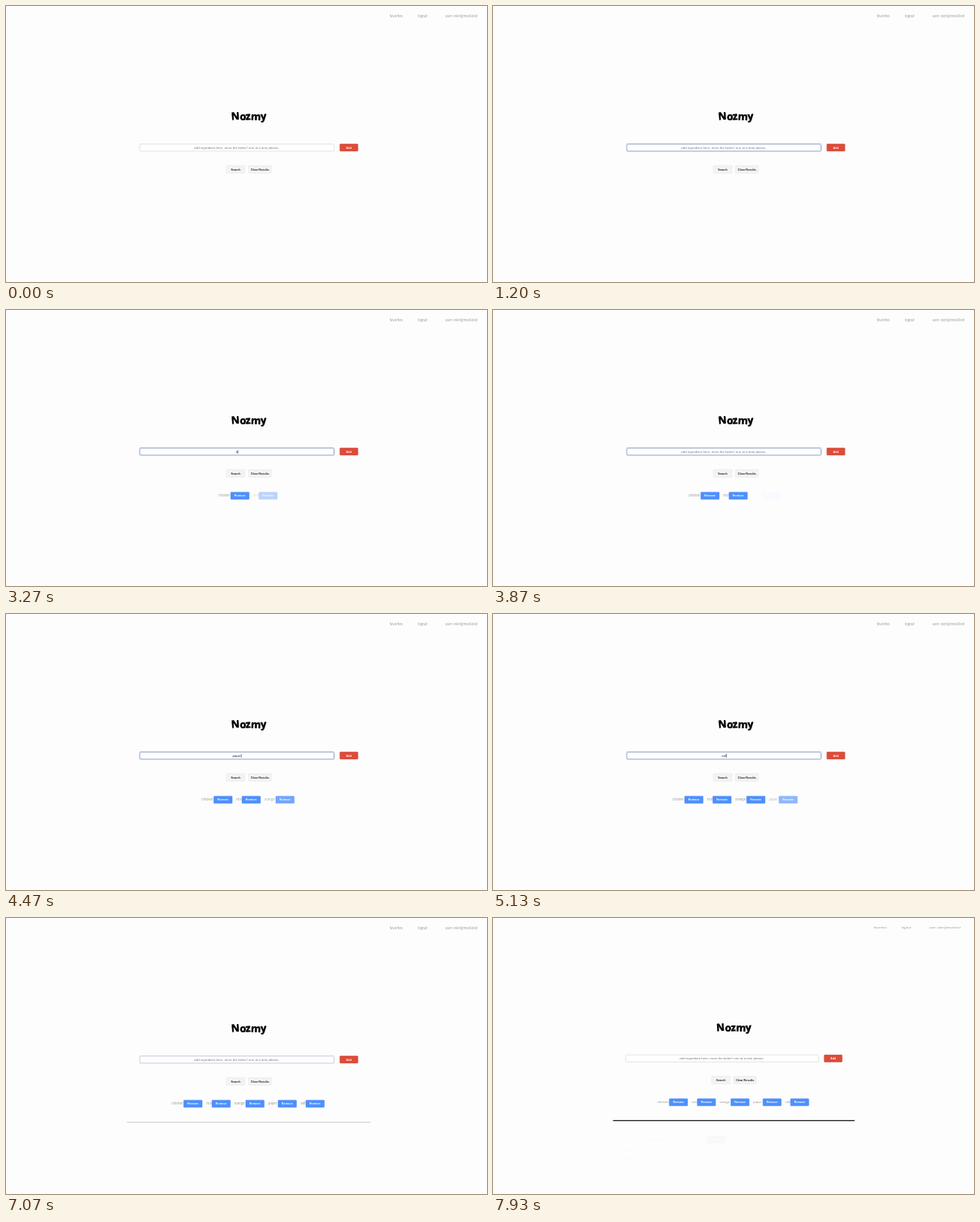
An HTML page for the animation above (8 s loop, 640 by 367 pixels).

```html
<!DOCTYPE html>
<html lang="en">
<head>
<meta charset="utf-8">
<title>Ingredient search</title>
<style>
  html, body { margin: 0; width: 100%; height: 100%; overflow: hidden; background: #fefdfe; }
  svg { display: block; width: 640px; height: 367px; }
  text { font: 4.4px "Liberation Sans", Arial, sans-serif; fill: #222; }
  .thin { font: 300 4.7px Lato, sans-serif; fill: #555; }
  .label { font: bold 3.8px "Liberation Sans", Arial, sans-serif; text-anchor: middle; }
  .white { fill: #fff; }
  .title { font: 600 13.5px "Noto Sans", sans-serif; fill: #000; stroke: #000; stroke-width: .5; stroke-linejoin: round; }
  .mid { text-anchor: middle; }
</style>
</head>
<body>
<svg viewBox="0 0 640 367">
  <g id="page">
    <text class="thin" x="510.5" y="14.6">favorites</text>
    <text class="thin" x="548" y="14.6">logout</text>
    <text class="thin" x="627.5" y="14.6" text-anchor="end">user: olen@mezil.test</text>
    <text class="title mid" x="323.3" y="151.6" rotate="-4 3 -3 2 -3">Nozmy</text>
    <rect id="field" x="178" y="183.5" width="258.5" height="9.5" rx="1" fill="#fff"/>
    <text id="entry" class="mid" x="307" y="189.9"></text>
    <rect id="caret" y="186" width=".5" height="5" fill="#000"/>
    <g id="buttons"></g>
    <g id="chips"></g>
    <rect id="rule" x="161" y="270.9" width="324" height="1.3" fill="#111"/>
    <g id="results"></g>
  </g>
</svg>
<script>
const LOOP = 8000;
const SEARCH = 6950, RESULTS = 7870;
const PLACEHOLDER = "add ingredient here, more the better! one at a time please.";
// start and step describe the typing, added is when the chip appears
const items = [
  { word: "chicken", start: 1330, step: 75,  added: 1870, labelWidth: 16.5 },
  { word: "rice",    start: 2300, step: 130, added: 2850, labelWidth: 8 },
  { word: "orange",  start: 3240, step: 75,  added: 3770, labelWidth: 15.5 },
  { word: "paper",   start: 4130, step: 75,  added: 4550, labelWidth: 13.5 },
  { word: "salt",    start: 4980, step: 70,  added: 5480, labelWidth: 7.5 }
];
const CHIP_BUTTON = 24.5, CHIP_GAP = 5, CHIP_CENTER = 321.75;

const $ = id => document.getElementById(id);
const clamp = v => Math.min(1, Math.max(0, v));
const swing = v => .5 - Math.cos(Math.PI * clamp(v)) / 2;

function add(parent, tag, attrs, text = "") {
  const el = document.createElementNS("http://www.w3.org/2000/svg", tag);
  for (const name in attrs) el.setAttribute(name, attrs[name]);
  el.textContent = text;
  return parent.appendChild(el);
}

function button(parent, x, y, width, height, label, fill, stroke, cls = "") {
  add(parent, "rect", { x, y, width, height, rx: .8, fill, stroke, "stroke-width": .5 });
  add(parent, "text", { class: "label " + cls, x: x + width / 2, y: y + height / 2 + 1.4 }, label);
}

button($("buttons"), 444.2, 183.5, 24, 9.5, "Add", "#dd4b39", "#c8402f", "white");
button($("buttons"), 293.2, 212.2, 24.8, 10.2, "Search", "#f3f3f3", "#e4e4e4");
button($("buttons"), 322.7, 212.2, 30.3, 10.2, "Clear Results", "#f3f3f3", "#e4e4e4");

for (const item of items) {
  item.chip = add($("chips"), "g", {});
  add(item.chip, "text", { class: "thin", x: .3, y: 248.3 }, item.word);
  button(item.chip, item.labelWidth, 242.2, CHIP_BUTTON, 9.5, "Remove", "#4d90fe", "#4585f0", "white");
}

add($("results"), "text", { class: "thin", x: 201, y: 298 }, "Orange chicken with salted rice");
button($("results"), 287, 292.2, 24.5, 9.5, "Save", "#999", "#999", "white");
["chicken", "brown rice", "orange", "salt", "water"].forEach((line, i) =>
  add($("results"), "text", { class: "thin", x: 170, y: 313 + i * 12 }, line));

function drawField(t) {
  const focus = t < SEARCH ? clamp((t - 470) / 200) : 1 - clamp((t - SEARCH) / 200);
  const mix = (a, b) => a + (b - a) * focus;
  $("field").setAttribute("stroke", `rgb(${mix(214, 138)},${mix(214, 158)},${mix(218, 196)})`);
  $("field").setAttribute("stroke-width", mix(.7, 1));

  const item = items.find(i => t >= i.start && t < i.added);
  const entry = $("entry"), caret = $("caret");
  entry.textContent = item ? item.word.slice(0, Math.floor((t - item.start) / item.step) + 1) : PLACEHOLDER;
  entry.style.fill = item ? "#222" : "#777";
  caret.setAttribute("opacity", item ? 1 : 0);
  caret.setAttribute("x", 307.2 + entry.getComputedTextLength() / 2);
}

function drawChips(t) {
  const shown = items.filter(i => t >= i.added);
  const total = shown.reduce((sum, i) => sum + i.labelWidth + CHIP_BUTTON + CHIP_GAP, -CHIP_GAP);
  let x = CHIP_CENTER - total / 2;
  for (const item of items) {
    item.chip.setAttribute("opacity", swing((t - item.added) / 1000));
    if (t < item.added) continue;
    item.chip.setAttribute("transform", `translate(${x} 0)`);
    x += item.labelWidth + CHIP_BUTTON + CHIP_GAP;
  }
}

function draw(now) {
  const t = now % LOOP;
  drawField(t);
  drawChips(t);
  $("rule").setAttribute("opacity", clamp((t - SEARCH - 50) / 400));
  $("results").setAttribute("opacity", t < RESULTS ? 0 : .02 + (t - RESULTS) / 3000);
  // the scrollbar narrows the page
  $("page").setAttribute("transform", `scale(${t < RESULTS ? 1 : 635 / 640})`);
  requestAnimationFrame(draw);
}
requestAnimationFrame(draw);
</script>
</body>
</html>
```
